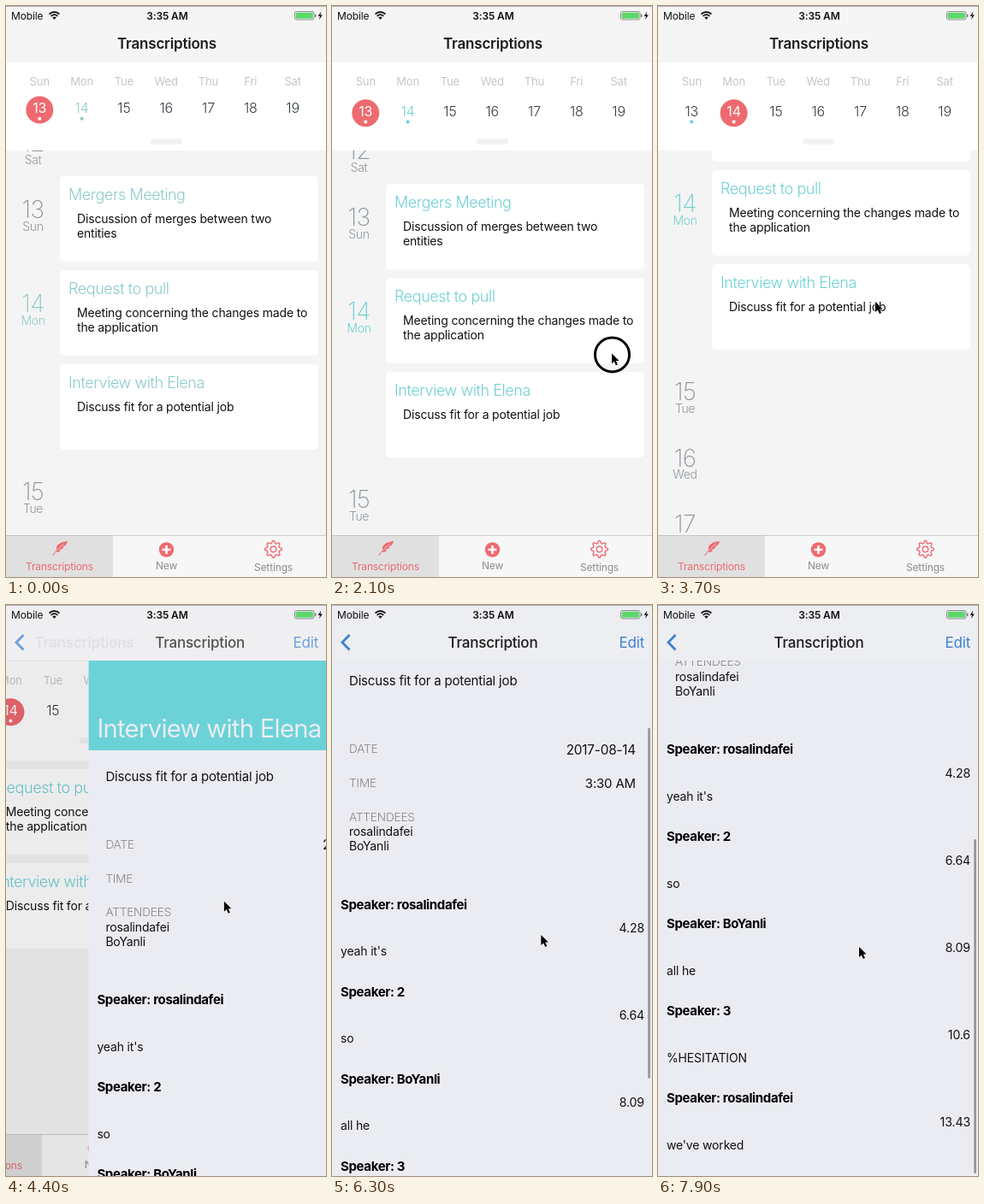
An HTML page that plays this animation: 374 px wide and 668 px high, repeating every 8 s.

```html
<!DOCTYPE html>
<html lang="en">
<head>
<meta charset="utf-8">
<style>
  html, body { margin: 0; width: 100%; height: 100%; overflow: hidden; background: #f4f4f4; }
  svg { display: block; width: 374px; height: 668px; }
  text { font-family: Inter, Roboto, sans-serif; letter-spacing: -.012em; white-space: pre; }
  .teal { fill: var(--teal); }
  .tight { letter-spacing: -.024em; }
</style>
</head>
<body>
<svg id="stage" viewBox="0 0 374 668"></svg>
<script>
const RED = '#ee6a70', BLUE = '#3d82d2', INK = '#111', PAGE = '#ebecf1', DETAIL_TEAL = '#6bd3d8';
const LOOP = 8000, STEP = 100;
const NAV_BOTTOM = 65, MAX_SCROLL = 274, THUMB_BOTTOM = 665;

const rect = (x, y, w, h, fill, more = '') =>
  `<rect x="${x}" y="${y}" width="${w}" height="${h}" fill="${fill}" ${more}/>`;
const dot = (x, y, r, fill, more = '') =>
  `<circle cx="${x}" cy="${y}" r="${r}" fill="${fill}" ${more}/>`;
const path = (d, more) => `<path d="${d}" ${more}/>`;
// y is the middle of the capitals
const text = (x, y, str, size, fill = INK, weight = 400, anchor = 'start', style = '') =>
  `<text x="${x}" y="${y + size * .364}" font-size="${size}" font-weight="${weight}" text-anchor="${anchor}" ` +
  `class="${style} ${fill === 'teal' ? 'teal' : ''}" fill="${fill}">${str}</text>`;

// Agenda list
const dayLabel = (num, name, y, color = '#8d979e') =>
  text(31.5, y, num, 28, color, 200, 'middle', 'tight') +
  text(31.5, y + 19.5, name, 14, color, 300, 'middle', 'tight');
const card = (y, title, lines) =>
  rect(63, y, 302, 100, '#fff', 'rx="5"') +
  text(73, y + 21, title, 18, 'teal', 300, 'start', 'tight') +
  lines.map((line, i) => text(83, y + 50 + i * 17, line, 14)).join('');

const agenda =
  dayLabel(12, 'Sat', 160) + dayLabel(13, 'Sun', 238) + dayLabel(14, 'Mon', 348, 'teal') +
  ['Tue', 'Wed', 'Thu', 'Fri'].map((d, i) => dayLabel(15 + i, d, 568 + i * 77.5)).join('') +
  card(199, 'Mergers Meeting', ['Discussion of merges between two', 'entities']) +
  card(309, 'Request to pull', ['Meeting concerning the changes made to', 'the application']) +
  card(419, 'Interview with Elena', ['Discuss fit for a potential job']);

// Week strip
const columnX = i => 39.3 + i * 49.3;
const week = ['Sun', 'Mon', 'Tue', 'Wed', 'Thu', 'Fri', 'Sat'];
const weekNames = week.map((d, i) => text(columnX(i), 88, d, 13, '#c3c7ca', 400, 'middle')).join('');
const weekDates = selected => week.map((_, i) => {
  const x = columnX(i), on = i === selected;
  const color = on ? '#fff' : i === 1 ? 'teal' : '#333b41';
  return (on ? dot(x, 121.5, 16, RED) : '') +
    text(x, 119.5, 13 + i, 16, color, on ? 400 : 300, 'middle') +
    (i < 2 ? dot(x, 131.7, 2, on ? '#fff' : 'var(--teal)') : '');
}).join('');

// Tab bar
const gear = 'M' + Array.from({ length: 32 }, (_, i) => {
  const a = (i - .5) * Math.PI / 16, r = i % 4 < 2 ? 9.8 : 7.3;
  return `${(312.5 + r * Math.cos(a)).toFixed(2)} ${(635.5 + r * Math.sin(a)).toFixed(2)}`;
}).join('L') + 'Z';
const tabLabel = (x, y, str, color) => text(x, y, str, 12, color, 400, 'middle');
const tabs =
  rect(0, 619, 374, 49, '#f7f7f8') + rect(0, 619, 125, 49, '#e0e0e1') + rect(0, 619, 374, .6, '#b4b4b4') +
  path('M54 643L59 636C58 630 64 627 72 626C71 629 70 631 68 632L66 632.5L67.5 633.3C66 635 64 636 62 636L64 637C62 639 60 639 58.5 639L55 643Z', `fill="${RED}"`) +
  path('M57 640Q62 633 68 629', 'fill="none" stroke="#e0e0e1" stroke-width=".8"') +
  dot(187.5, 636, 8.7, RED) +
  path('M182.5 636h10M187.5 631v10', 'stroke="#fff" stroke-width="2.6"') +
  path(gear, `fill="none" stroke="${RED}" stroke-width="1.4" stroke-linejoin="round"`) +
  dot(312.5, 635.5, 3.3, 'none', `stroke="${RED}" stroke-width="1.4"`) +
  tabLabel(62.5, 656, 'Transcriptions', RED) +
  tabLabel(187.5, 655, 'New', '#8c8c90') +
  tabLabel(312.5, 657, 'Settings', '#8c8c90');

// Detail page
const turns = [
  ['rosalindafei', '4.28', "yeah it's"], ['2', '6.64', 'so'], ['BoYanli', '8.09', 'all he'],
  ['3', '10.6', '%HESITATION'], ['rosalindafei', '13.43', "we've worked"]
];
const caption = (y, str) => text(20, y, str, 13.6, '#86868b', 300);
const detail =
  rect(0, NAV_BOTTOM, 374, 105, DETAIL_TEAL) +
  text(10, 144, 'Interview with Elena', 29.2, PAGE, 400, 'start', 'tight') +
  text(20, 200.5, 'Discuss fit for a potential job', 15) +
  caption(280, 'DATE') + text(355, 280.5, '2017-08-14', 15.3, INK, 400, 'end') +
  caption(320, 'TIME') + text(355, 320.5, '3:30 AM', 15, INK, 400, 'end') +
  caption(359.5, 'ATTENDEES') + text(20, 376.5, 'rosalindafei', 14) + text(20, 393.5, 'BoYanli', 14) +
  turns.map(([who, at, said], i) => {
    const y = 462 + i * 102;
    return text(10, y, 'Speaker: ' + who, 15, '#000', 700, 'start', 'tight') +
      text(365, y + 27.5, at, 14.2, INK, 400, 'end') + text(10, y + 54.5, said, 14);
  }).join('');

const statusBar =
  text(6, 11.5, 'Mobile', 12) +
  text(188.5, 11.5, '3:35 AM', 12, INK, 600, 'middle') +
  path('M50.5 9.5Q56.5 4.5 62.5 9.5M52.6 11.8Q56.5 8.6 60.4 11.8', 'fill="none" stroke="#111" stroke-width="1.7"') +
  path('M54.2 13.3Q56.5 11.5 58.8 13.3L56.5 16Z', `fill="${INK}"`) +
  rect(337.5, 6.5, 22.5, 9.5, 'none', 'rx="2" stroke="#777" stroke-width=".8"') +
  rect(338.7, 7.7, 20.1, 7.1, '#5cd769', 'rx="1"') +
  rect(361, 9.5, 1.4, 3.6, '#777', 'rx=".7"') +
  path('M368.3 6.5L364.6 12H367L366 16L369.9 10.4H367.4Z', `fill="${INK}"`) +
  rect(0, 0, 374, 1, '#b0b0b2');

const stage = document.getElementById('stage');
stage.innerHTML = `
  <clipPath id="listClip">${rect(0, 169, 374, 450, '#000')}</clipPath>
  <clipPath id="bodyClip">${rect(0, NAV_BOTTOM, 374, 603, '#000')}</clipPath>
  <g id="home">
    ${rect(0, 0, 374, 668, '#f4f4f4')}
    <g clip-path="url(#listClip)"><g id="list">${agenda}</g></g>
    ${rect(0, 66, 374, 103, '#fff')}${weekNames}
    <g id="dates0">${weekDates(0)}</g><g id="dates1">${weekDates(1)}</g>
    ${rect(169, 155, 37, 7, '#f1f2f3', 'rx="3"')}${tabs}
  </g>
  ${rect(0, 0, 374, 668, '#000', 'id="shade"')}
  <g id="page">
    ${rect(0, 0, 374, 668, PAGE)}
    <g clip-path="url(#bodyClip)"><g id="body">${detail}</g></g>
    ${rect(369.3, 68, 2.6, 410, '#929297', 'id="thumb" rx="1.3"')}
  </g>
  ${rect(0, 0, 374, NAV_BOTTOM, '#f5f5f5')}
  <g id="homeNav">${text(188, 44, 'Transcriptions', 17, '#1c1c1c', 600, 'middle')}</g>
  <g id="pageNav">
    ${rect(0, 0, 374, NAV_BOTTOM, '#edeef2')}
    ${path('M20.5 35L12 43.7L20.5 52.4', `fill="none" stroke="${BLUE}" stroke-width="2.8"`)}
    ${text(365, 44, 'Edit', 17, BLUE, 400, 'end')}
    <g id="pageTitle">${text(188, 44, 'Transcription', 17, '#1c1c1c', 500, 'middle')}</g>
  </g>
  ${statusBar}
  <g id="cursor">
    ${dot(1.5, 2.5, 20, 'none', 'id="press" stroke="#000" stroke-width="3"')}
    ${path('M1 1V13L3.8 10.4L5.9 15L8 14.1L5.9 9.6H9.6Z', 'fill="#000" stroke="#fff" stroke-width="1" paint-order="stroke"')}
  </g>`;
const el = Object.fromEntries([...stage.querySelectorAll('[id]')].map(n => [n.id, n]));

const smooth = k => k * k * (3 - 2 * k);
// Value of a track of [time, value] points
function track(points, t, ease = k => k) {
  const i = points.findIndex(p => p[0] > t);
  if (i === 0) return points[0][1];
  if (i < 0) return points[points.length - 1][1];
  const [t0, a] = points[i - 1], [t1, b] = points[i];
  return a + (b - a) * ease((t - t0) / (t1 - t0));
}
const within = (t, spans) => spans.some(([a, b]) => t >= a && t < b);

const listTrack = [[0, 0], [300, 28], [600, 41], [900, 45], [1600, 45], [2200, 2], [2800, -34],
  [3000, -70], [3200, -95], [3400, -110], [3700, -117]];
const bodyTrack = [[5700, 0], [6200, 95], [6400, 128], [6700, 154], [7000, 164], [7200, 164],
  [7400, 215], [7700, 300], [7900, 293]];
const cursorX = [[1000, 385], [1400, 329], [1700, 329], [2800, 319], [3000, 316], [3600, 253], [4300, 253],
  [4900, 265], [5300, 265], [5600, 250], [6900, 238], [7200, 238], [7700, 234]];
const cursorY = [[1000, 436], [1400, 443], [1600, 443], [2800, 343], [3000, 318], [3600, 345], [4300, 345],
  [4900, 354], [5300, 354], [5600, 510], [6300, 385], [6900, 560], [7200, 560], [7700, 399]];
const presses = [[1400, 2900], [3900, 4100], [5650, 6300], [7200, 7700]];

const move = (node, x, y = 0) => node.setAttribute('transform', `translate(${x} ${y})`);
const show = (node, on) => node.setAttribute('opacity', +on);

function draw(t) {
  stage.style.setProperty('--teal', t < 1600 ? '#8ccbc9' : '#6fd0d4');
  move(el.list, 0, track(listTrack, t));
  const selected = t < 3100 ? 0 : 1, drop = t < 1600 ? 0 : 3.7;
  [el.dates0, el.dates1].forEach((g, i) => { show(g, i === selected); move(g, 0, drop); });

  const k = Math.min(1, Math.max(0, (t - 4200) / 550)), push = 1 - (1 - k) ** 3;
  move(el.home, -112 * push);
  show(el.shade, .1 * push);
  move(el.page, 374 * (1 - push));
  show(el.homeNav, 1 - push);
  move(el.homeNav, -130 * push);
  show(el.pageNav, push);
  move(el.pageTitle, 150 * (1 - push));

  // Past the end the scroll thumb shrinks against the bottom
  const scroll = track(bodyTrack, t), over = Math.max(0, scroll - MAX_SCROLL);
  const length = 410 - over;
  move(el.body, 0, -scroll);
  el.thumb.setAttribute('y', over ? THUMB_BOTTOM - length : 68 + .68 * scroll);
  el.thumb.setAttribute('height', length);
  show(el.thumb, t > 5700);

  move(el.cursor, track(cursorX, t, smooth), track(cursorY, t, smooth));
  show(el.cursor, t > 1000);
  show(el.press, within(t, presses));
}

const start = performance.now();
function frame() {
  const t = (performance.now() - start) % LOOP;
  draw(Math.floor(t / STEP) * STEP);
  requestAnimationFrame(frame);
}
frame();
</script>
</body>
</html>
```
